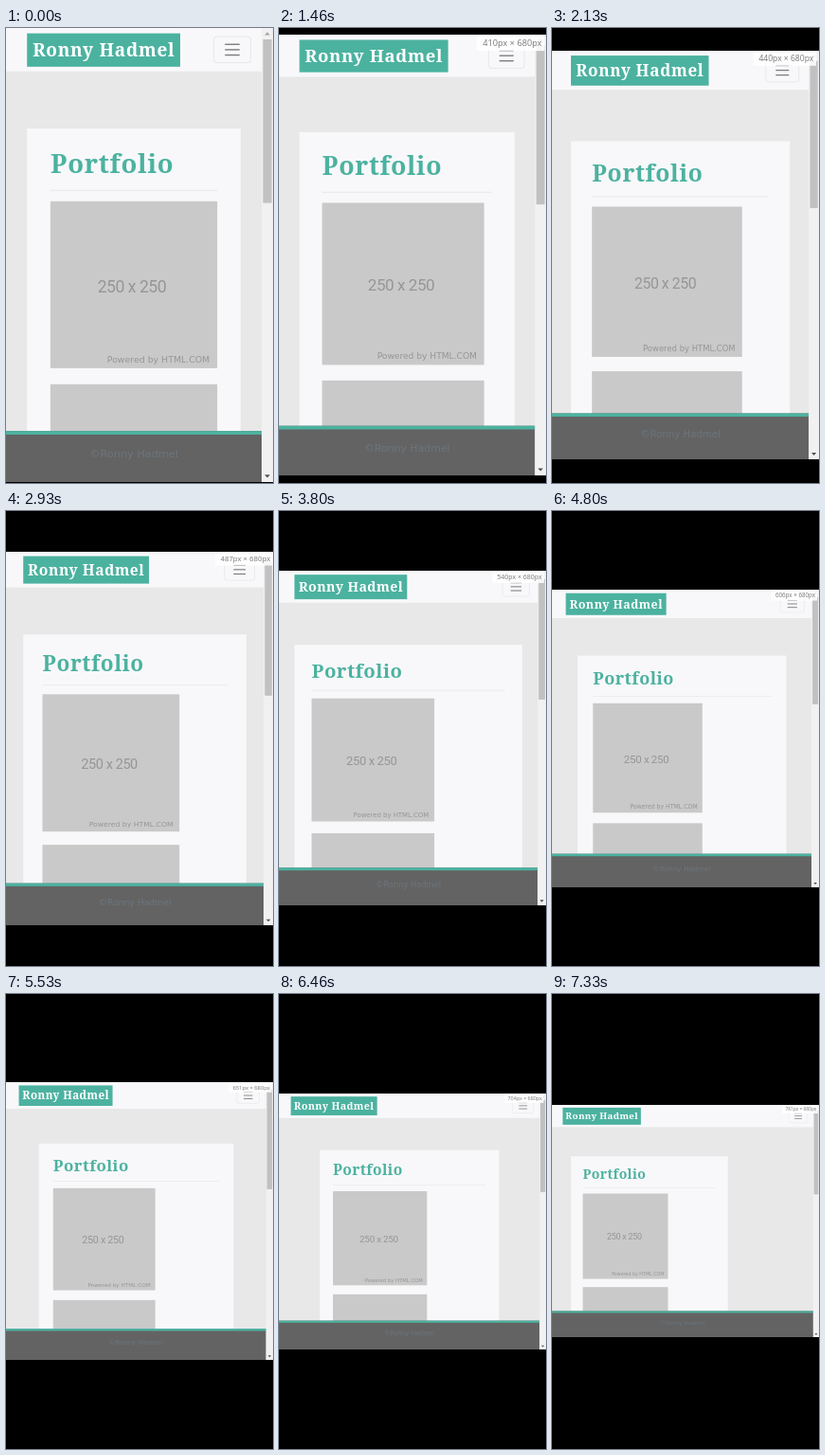
Animation of 282x480 px, one loop 8 s. Source, as an HTML page with a canvas:

```html
<!DOCTYPE html>
<html lang="en">
<head>
<meta charset="utf-8">
<title>Responsive portfolio</title>
<style>
  html, body { margin: 0; width: 100%; height: 100%; overflow: hidden; background: #000; }
  canvas { display: block; width: 282px; height: 480px; }
</style>
</head>
<body>
<canvas id="stage"></canvas>
<script>
const STAGE_W = 282, STAGE_H = 480, VIEW_H = 680, BAR = 17;
const LOOP = 8000, START = 1000, STEP = 200 / 3, LAST_STEP = 95;
const FOOTER_Y = 603.5;
const OWNER = 'Ronny Hadmel';
const TEAL = '#4cb2a0', LIGHT = '#f8f8fa', GREY = '#c9c9c9';
const SERIF = '"Noto Serif", serif';
const SANS = '"DejaVu Sans", sans-serif';

// [step, viewport width] while the window is dragged wider
const DRAG = [
  [-1, 400], [0, 401], [6, 410], [7, 412], [12, 425], [25, 476], [28, 487],
  [29, 487.3], [38, 522.5], [41, 540], [42, 544], [51, 572.5], [56, 606],
  [57, 610], [64, 641], [67, 651], [68, 654], [77, 684], [90, 752],
  [94, 781], [95, 784]
];

const canvas = document.getElementById('stage');
const ctx = canvas.getContext('2d');
const dpr = window.devicePixelRatio || 1;
canvas.width = STAGE_W * dpr;
canvas.height = STAGE_H * dpr;

function widthAt(step) {
  if (step <= DRAG[0][0]) return DRAG[0][1];
  const i = DRAG.findIndex(([s]) => s >= step);
  const [s1, w1] = DRAG[i];
  const [s0, w0] = DRAG[i - 1];
  return w0 + (w1 - w0) * (step - s0) / (s1 - s0);
}

function rect(x, y, w, h, color) {
  ctx.fillStyle = color;
  ctx.fillRect(x, y, w, h);
}

function text(str, x, y, font, color, align = 'left', spacing = 0) {
  ctx.font = font;
  ctx.fillStyle = color;
  ctx.textAlign = align;
  ctx.letterSpacing = spacing + 'px';
  ctx.fillText(str, x, y);
}

function triangle(x, y, dir, color) {
  ctx.fillStyle = color;
  ctx.beginPath();
  ctx.moveTo(x - 4, y - 2 * dir);
  ctx.lineTo(x + 4, y - 2 * dir);
  ctx.lineTo(x, y + 2.5 * dir);
  ctx.fill();
}

function placeholder(x, y) {
  const height = Math.min(250, FOOTER_Y + 1 - y);
  rect(x, y, 250, height, GREY);
  if (height < 250) return;
  text('250 x 250', x + 122, y + 136, '25px Roboto, sans-serif', '#969696', 'center', -.7);
  text('Powered by HTML.COM', x + 85, y + 241, '13.3px ' + SANS, '#969696');
}

// Panel bounds follow the layout breakpoints at 576 and 768.
function panelBounds(view, content) {
  if (view >= 768) return [(content - 720) / 2 + 32, 461];
  if (view >= 576) return [(content - 540) / 2 + 32, 477];
  return [31.5, content - 63];
}

function drawPanel(view, content) {
  const [left, width] = panelBounds(view, content);
  const x = left + 35;
  rect(left, 150.5, width, FOOTER_Y - 149.5, LIGHT);
  text('Portfolio', x, 217, 'bold 39px ' + SERIF, TEAL, 'left', 1);
  rect(x, 242.5, width - 70, 1, 'rgba(0,0,0,.1)');
  placeholder(x, 259.5);
  placeholder(x, 533.5);
}

function drawHeader(content) {
  rect(0, 0, content, 65, LIGHT);
  rect(31.5, 8, 229.5, 50, TEAL);
  text(OWNER, 146.5, 42.5, 'bold 27px ' + SERIF, '#fff', 'center', 1);

  const x = content - 72;
  ctx.strokeStyle = 'rgba(0,0,0,.1)';
  ctx.lineWidth = 1;
  ctx.beginPath();
  ctx.roundRect(x + .5, 13, 55, 39, 4);
  ctx.stroke();
  for (let i = 0; i < 3; i++) rect(x + 17, 23.5 + i * 8, 22, 2, 'rgba(0,0,0,.5)');
}

function drawFooter(content) {
  rect(0, FOOTER_Y, content, VIEW_H - FOOTER_Y, '#636363');
  rect(0, FOOTER_Y, content, 5.5, TEAL);
  text('©' + OWNER, content / 2, 643, '16px ' + SANS, '#6c757d', 'center');
}

function drawScrollbar(x) {
  rect(x, 0, BAR, VIEW_H, '#f1f1f1');
  rect(x + 2, 17, 13, 245, '#c1c1c1');
  triangle(x + 8.5, 8.5, -1, '#a3a3a3');
  triangle(x + 8.5, 671, 1, '#505050');
}

function drawBadge(width) {
  rect(width - 105, 0, 105, 25, 'rgba(255,255,255,.85)');
  text(`${width}px × ${VIEW_H}px`, width - 4.5, 17.5,
    '13.5px "Open Sans", sans-serif', '#777', 'right');
}

function draw(time) {
  const step = Math.min(LAST_STEP, Math.floor((time - START + 8) / STEP));
  const view = widthAt(step);
  const content = view - BAR;
  const scale = STAGE_W / view;
  const height = Math.round(VIEW_H * scale);

  ctx.setTransform(dpr, 0, 0, dpr, 0, 0);
  rect(0, 0, STAGE_W, STAGE_H, '#000');
  // Whole-pixel page edges keep the letterbox crisp.
  ctx.translate(0, Math.floor((STAGE_H - height) / 2));
  ctx.scale(scale, height / VIEW_H);

  rect(0, 0, view, VIEW_H, '#e8e8e8');
  drawPanel(view, content);
  drawHeader(content);
  drawFooter(content);
  drawScrollbar(content);
  // The size label trails the window by one step.
  if (step >= 0) drawBadge(Math.floor(widthAt(step - 1)));
}

function tick() {
  draw(performance.now() % LOOP);
  requestAnimationFrame(tick);
}
tick();
</script>
</body>
</html>
```
